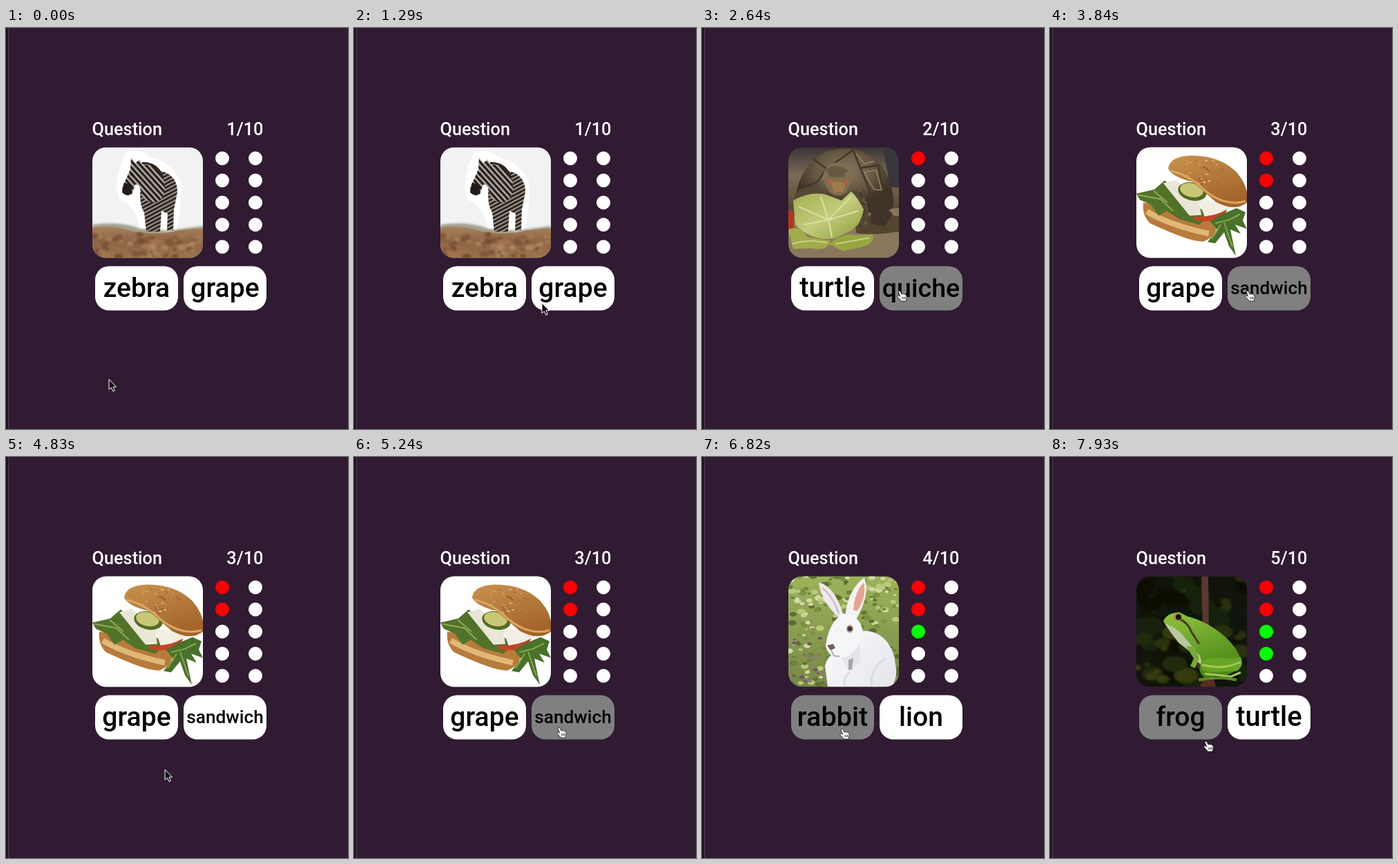
Recreate the animation shown at these times as an HTML page. Size 495 px wide and 580 px high, loop 7.99 s.

```html
<!DOCTYPE html>
<html lang="en">
<head>
<meta charset="utf-8">
<title>Picture quiz</title>
<style>
  html, body { margin: 0; width: 100%; height: 100%; overflow: hidden; background: #301b32; }
  svg { display: block; }
  text { font-family: Roboto, "Open Sans", sans-serif; font-weight: 500; }
  .head { font-size: 25.3px; fill: #fff; }
  .word { text-anchor: middle; fill: #000; }
  .photo, .cursor { display: none; }
  .on { display: inline; }
</style>
</head>
<body>
<svg width="495" height="580" viewBox="0 0 495 580">
  <defs>
    <clipPath id="card"><rect width="160" height="160" rx="20"/></clipPath>
    <pattern id="stripes" width="5" height="5" patternUnits="userSpaceOnUse" patternTransform="rotate(-28)">
      <rect width="5" height="5" fill="#a0968a"/><rect width="5" height="3" fill="#2d2723"/>
    </pattern>
    <pattern id="neck" width="6" height="6" patternUnits="userSpaceOnUse" patternTransform="rotate(48)">
      <rect width="6" height="6" fill="#b8aea2"/><rect width="6" height="3.4" fill="#241f1c"/>
    </pattern>
    <linearGradient id="soil" x2="0" y2="1">
      <stop stop-color="#a8835f"/><stop offset=".45" stop-color="#8e6442"/><stop offset="1" stop-color="#9c7450"/>
    </linearGradient>
    <linearGradient id="crust" x2=".5" y2="1">
      <stop stop-color="#c8924f"/><stop offset="1" stop-color="#a4652a"/>
    </linearGradient>
    <linearGradient id="lime" x2=".4" y2="1">
      <stop stop-color="#93c440"/><stop offset="1" stop-color="#4c8a16"/>
    </linearGradient>
    <linearGradient id="yard" x2="0" y2="1">
      <stop stop-color="#3a3438"/><stop offset=".25" stop-color="#7b6b54"/>
      <stop offset=".55" stop-color="#5b4a35"/><stop offset="1" stop-color="#8c795c"/>
    </linearGradient>
    <radialGradient id="shell" cy=".35">
      <stop stop-color="#85765d"/><stop offset=".6" stop-color="#665842"/><stop offset="1" stop-color="#3f3325"/>
    </radialGradient>
    <linearGradient id="leaf" x2="1" y2="1">
      <stop stop-color="#a0ae50"/><stop offset=".5" stop-color="#c3cb7a"/><stop offset="1" stop-color="#8d9c3c"/>
    </linearGradient>
    <linearGradient id="grass" x2="0" y2="1">
      <stop stop-color="#9cb35a"/><stop offset="1" stop-color="#768847"/>
    </linearGradient>
    <linearGradient id="fur" x2="1" y2=".6">
      <stop stop-color="#fbfbfc"/><stop offset="1" stop-color="#e6e8ee"/>
    </linearGradient>
    <filter id="soft"><feGaussianBlur stdDeviation="1.4"/></filter>
    <filter id="fine"><feGaussianBlur stdDeviation=".7"/></filter>
  </defs>

  <rect width="495" height="580" fill="#301b32"/>
  <rect width="3" height="580" fill="#1d1220"/>
  <rect x="3" width="1" height="580" fill="#514053"/>

  <text class="head" x="124.5" y="155">Question</text>
  <text class="head" id="count" x="372.5" y="155" text-anchor="end"></text>
  <g id="dots"></g>

  <g transform="translate(125 172.5)"><g clip-path="url(#card)">
    <g class="photo">
      <rect width="160" height="160" fill="#f2f2f3"/>
      <path d="M48 8Q70 0 84 14Q116 22 128 50Q130 90 122 118H68Q64 86 40 76Q28 54 48 8Z" fill="#fff"/>
      <path d="M0 112Q40 106 70 118L110 121Q140 116 160 114V135H0Z" fill="#a3a08e" filter="url(#soft)"/>
      <path d="M0 116Q30 112 60 122Q100 128 125 120L160 117V160H0Z" fill="url(#soil)"/>
      <g id="clods" filter="url(#soft)"></g>
      <g filter="url(#fine)">
        <path d="M71 46Q92 28 109 38Q123 46 123 65L118 90L117 120H108L109 96L100 92L98 122H78L75 94Q66 82 71 46Z" fill="url(#stripes)"/>
        <path d="M56 15L62 23L68 18L73 25Q94 24 100 40Q112 62 96 79Q78 82 72 70Q69 52 62 54L57 68Q49 72 44 65Q42 58 46 52L55 32Z" fill="url(#neck)"/>
        <path d="M72 23Q94 22 102 44" fill="none" stroke="#2c2521" stroke-width="3"/>
        <path d="M46 51L58 55L57 67Q49 72 43 65Z" fill="#211c1a"/>
        <circle cx="57" cy="39" r="2" fill="#111"/>
      </g>
    </g>

    <g class="photo" filter="url(#fine)">
      <rect width="160" height="160" fill="url(#yard)"/>
      <path d="M137 0H160V58H147Z" fill="#38363d"/>
      <path d="M0 100L160 88V160H0Z" fill="#8a775b"/>
      <path d="M98 105Q130 92 160 100V122Q125 128 98 124Z" fill="#54442f"/>
      <path d="M10 72Q18 24 55 6Q106-8 136 28Q156 62 151 88Q126 104 92 85L14 84Z" fill="url(#shell)"/>
      <path d="M94 4L104 30L130 26M104 30L119 66L150 76M119 66L99 84M36 17L55 31L94 4M55 31L42 50L14 62M130 26L139 73" fill="none" stroke="#42362a" stroke-width="2.5"/>
      <path d="M98 9L110 24L124 20M110 36L124 61L135 62L127 33Z" fill="none" stroke="#978768" stroke-width="1.5"/>
      <path d="M10 66Q28 50 53 66V85H8Z" fill="#564934"/>
      <path d="M92 62Q112 60 116 92Q118 118 105 121L89 112Z" fill="#544733"/>
      <path d="M119 92Q143 84 151 97L139 115L120 111Z" fill="#40342a"/>
      <path d="M49 46Q52 23 70 22Q89 23 92 46L84 65Q72 75 59 64Z" fill="#806d50"/>
      <path d="M54 32Q70 22 86 33L80 43H60Z" fill="#665942"/>
      <path d="M62 51Q71 46 82 53L80 64L66 66Z" fill="#a07b48"/>
      <g fill="#cf592a"><circle cx="60" cy="49" r="2.5"/><circle cx="84" cy="50" r="2.5"/></g>
      <g id="scales"></g>
      <path d="M0 91L8 94V118H0Z" fill="#b5361d"/>
      <path d="M7 77Q30 64 53 68L77 77L91 64Q100 72 109 90Q105 111 92 120L67 132Q34 137 10 112Z" fill="url(#leaf)"/>
      <path d="M15 86L58 105L91 71M58 105L101 92M58 105L22 112M58 105L63 130M58 105L47 72" fill="none" stroke="#d9dea4" stroke-width="2.2"/>
      <path d="M0 120Q14 110 28 130L61 135Q57 151 34 146L7 147Z" fill="#a0ad4a"/>
      <path d="M58 140Q78 123 99 127L122 126Q126 139 107 144L80 150Z" fill="#98a642"/>
      <path d="M5 140Q28 132 56 138M68 140L117 131" fill="none" stroke="#c9d083" stroke-width="2"/>
    </g>

    <g class="photo" filter="url(#fine)">
      <rect x="-5" y="-5" width="170" height="170" fill="#fff"/>
      <path d="M10 80Q35 83 66 101L118 107Q117 128 98 136Q82 139 20 110Q8 99 10 80Z" fill="#b77b3b"/>
      <path d="M15 93Q49 113 105 125" fill="none" stroke="#e0b878" stroke-width="8"/>
      <path d="M0 67L26 61L41 48L70 72L106 98L91 112L62 104L44 92L32 99L21 83L5 76Z" fill="#517329"/>
      <path d="M3 69L35 75L53 92M25 63L45 80" stroke="#90aa55" stroke-width="2" fill="none"/>
      <path d="M39 52L57 47L91 76L94 98L77 99Z" fill="#e9e6d7"/>
      <path d="M90 76L126 78L137 88L99 101Z" fill="#f1eee3"/>
      <path d="M82 100Q110 102 131 90L128 100Q109 111 83 105Z" fill="#c54325"/>
      <ellipse cx="81" cy="64" rx="21" ry="13" transform="rotate(12 81 64)" fill="#536c22"/>
      <ellipse cx="80" cy="62" rx="17" ry="10" transform="rotate(12 80 62)" fill="#c9c776"/>
      <path d="M46 31Q48 13 79 12Q121 12 145 36Q164 58 160 80Q143 94 115 79L81 50Q52 43 46 31Z" fill="url(#crust)"/>
      <path d="M49 34Q76 40 96 60Q127 87 158 78" fill="none" stroke="#d8a860" stroke-width="3"/>
      <g id="seeds"></g>
      <path d="M107 107L121 98L145 88L158 94L154 106L160 118L143 112L151 125L136 119L144 157L134 143L127 123L114 139L103 137L117 119Z" fill="#48712b"/>
      <path d="M114 110L134 105L150 97M127 109L139 144M122 112L109 133" fill="none" stroke="#89a64c" stroke-width="2"/>
    </g>

    <g class="photo">
      <rect width="160" height="160" fill="url(#grass)"/>
      <g id="meadow" filter="url(#fine)"></g>
      <g filter="url(#fine)">
        <path d="M76 62Q48 39 44 9Q67 14 80 57Z" fill="#eceaee"/>
        <path d="M49 17Q64 28 73 54" fill="none" stroke="#d3bcbb" stroke-width="2.5"/>
        <path d="M82 58Q86 19 110 2Q119 25 99 61Z" fill="#f4f1f3"/>
        <path d="M94 49Q96 22 109 9Q114 28 100 50Z" fill="#e6a492"/>
        <path d="M57 160L53 130Q57 113 70 111L101 80Q126 75 143 95Q154 110 155 128Q159 144 150 160Z" fill="url(#fur)"/>
        <path d="M54 101Q58 67 79 54Q104 55 108 81Q102 108 82 117Q60 122 54 101Z" fill="#f6f6f9"/>
        <path d="M76 118Q92 117 103 97L105 123L88 138Z" fill="#e3e5eb"/>
        <path d="M87 121L94 118L92 135H87Z" fill="#a6a49e"/>
        <ellipse cx="89" cy="76" rx="5" ry="6" fill="#bda4a0"/><circle cx="89" cy="76" r="3.5" fill="#44333a"/>
        <path d="M56 100L65 98L68 104L61 107Z" fill="#765f5e"/>
        <path d="M62 107L66 115L74 116" fill="none" stroke="#b7aaad" stroke-width="2"/>
        <path d="M82 160Q79 145 89 138M121 160Q117 133 141 119" fill="none" stroke="#d3d6de" stroke-width="2"/>
      </g>
    </g>

    <g class="photo">
      <rect width="160" height="160" fill="#10140a"/>
      <g id="thicket" filter="url(#soft)"></g>
      <g filter="url(#fine)">
        <path d="M94 0H104L105 75H96Z" fill="#5a3831"/>
        <path d="M83 122L97 145L92 160H115L110 139Z" fill="#592d24"/>
        <path d="M39 65Q44 53 62 52L74 58Q105 66 130 89Q147 105 151 121Q151 136 130 143L99 146Q89 141 93 127L85 112L70 99Q49 83 39 65Z" fill="url(#lime)"/>
        <path d="M41 68Q61 75 72 91L92 115L96 130Q83 121 79 110L61 96Q49 81 41 68Z" fill="#b9c7a0"/>
        <path d="M61 61Q75 67 80 81L91 98" fill="none" stroke="#473b29" stroke-width="3"/>
        <path d="M72 101L84 102L91 118L85 133L78 130L83 119Z" fill="#78aa36"/>
        <path d="M93 125Q107 115 132 119L151 117Q157 128 146 137L105 139Q92 135 93 125Z" fill="#68a524"/>
        <path d="M95 128Q125 136 151 124M99 141L137 145L151 139" fill="none" stroke="#a3c957" stroke-width="3"/>
        <path d="M90 150Q121 144 145 150" fill="none" stroke="#5d8a25" stroke-width="4"/>
        <circle cx="60" cy="59" r="6" fill="#a78a45"/><circle cx="61" cy="59" r="4" fill="#16130e"/>
      </g>
    </g>
  </g></g>

  <g id="buttons"></g>

  <g id="pointer" stroke-linejoin="round">
    <path class="cursor" d="M0 0V15L3.4 12L5.8 17.5L8.3 16.4L6 11H10.5Z" fill="#111" stroke="#fff"/>
    <path class="cursor" d="M2.2 2.5Q2.4 .6 4 1.2Q5.2 1.7 5.8 3.4L7 6.2Q8.3 4.6 9.5 6Q11 5 12 6.6Q13.6 6.3 14 8.2Q14.8 11 13.6 13.4L13.4 16H6.6Q4.6 14 3.2 12.2L.8 9.8Q.2 8 2 7.8Q3.4 8 4.6 9.4Z M7.6 10L8.2 13.4M9.8 9.8L10.2 13.2M11.9 9.6L12 13" fill="#fff" stroke="#1c1c1c" stroke-width=".9"/>
  </g>
</svg>
<script>
const LOOP = 7990;
const $ = id => document.getElementById(id);

// Each question: start time and the two answers as [word, font size].
const questions = [
  { at: 0, words: [["zebra", 39], ["grape", 39]] },
  { at: 2640, words: [["turtle", 40], ["quiche", 37.5]] },
  { at: 3840, words: [["grape", 39], ["sandwich", 26.2]] },
  { at: 5530, words: [["rabbit", 39.5], ["lion", 39]] },
  { at: 7120, words: [["frog", 39], ["turtle", 40]] }
];
const results = ["#f00", "#f00", "#0f0", "#0f0"];

// Hovered button from a given time on; -1 is none.
const hovers = [
  [0, -1], [1350, 1], [1460, -1], [1850, 0], [2110, 1], [4530, -1],
  [5110, 1], [5950, -1], [6630, 0]
];

// Pointer path: time, x, y.
const path = [
  [0, 149, 508], [490, 149, 508], [900, 212, 462], [1290, 272, 398],
  [1400, 262, 362], [1640, 222, 260], [1830, 205, 340], [1950, 216, 371],
  [2050, 246, 376], [2110, 265, 375], [2290, 282, 379], [4380, 282, 379],
  [4550, 261, 417], [4830, 230, 452], [4950, 236, 449], [5180, 296, 391],
  [5240, 293, 390], [5840, 293, 390], [5890, 270, 414], [6000, 246, 433],
  [6150, 226, 444], [6400, 210, 435], [6650, 200, 404], [6820, 199, 392],
  [7600, 199, 392], [7930, 222, 410], [LOOP, 222, 410]
];

function add(parent, tag, attrs) {
  const el = document.createElementNS("http://www.w3.org/2000/svg", tag);
  for (const key in attrs) el.setAttribute(key, attrs[key]);
  return parent.appendChild(el);
}

function scatter(id, seed, count, [x, y, w, h], size, colors) {
  const random = () => (seed = seed * 16807 % 2147483647) / 2147483647;
  for (let i = 0; i < count; i++) {
    const r = size * (0.4 + random());
    add($(id), "ellipse", {
      cx: x + w * random(), cy: y + h * random(), rx: r, ry: r * 0.65,
      fill: colors[i % colors.length]
    });
  }
}

scatter("clods", 71, 70, [0, 126, 160, 34], 5, ["#805638", "#ab8461", "#75502f", "#a17450"]);
scatter("scales", 47, 45, [90, 62, 26, 54], 1.8, ["#72634a", "#3f3325"]);
scatter("seeds", 23, 40, [72, 18, 55, 35], 1.5, ["#e0bb7a", "#98602b"]);
scatter("meadow", 37, 240, [0, 0, 160, 160], 4.5, ["#6c8338", "#b9c97c", "#7b9142", "#d3d9a4", "#5c7033"]);
scatter("meadow", 91, 26, [0, 75, 55, 80], 3, ["#735465", "#957583"]);
scatter("thicket", 53, 55, [0, 0, 160, 160], 15, ["#182008", "#0a0e06", "#29300e", "#11170a"]);
scatter("thicket", 19, 14, [0, 80, 80, 70], 13, ["#353b11", "#222a0b"]);

const dots = Array.from({ length: 10 }, (_, i) => add($("dots"), "circle", {
  cx: i < 5 ? 313 : 361, cy: 188.5 + i % 5 * 32, r: 10
}));
const buttons = [129, 257].map(x => ({
  box: add($("buttons"), "rect", { x, y: 344.5, width: 120, height: 64, rx: 20 }),
  label: add($("buttons"), "text", { class: "word", x: x + 60 })
}));
const photos = document.querySelectorAll(".photo");
const cursors = document.querySelectorAll(".cursor");

function position(t) {
  const i = path.findIndex(p => p[0] > t);
  const [t0, x0, y0] = path[i - 1], [t1, x1, y1] = path[i];
  const k = (t - t0) / (t1 - t0);
  return [x0 + (x1 - x0) * k, y0 + (y1 - y0) * k];
}

function showQuestion(index) {
  $("count").textContent = `${index + 1}/10`;
  photos.forEach((photo, i) => photo.classList.toggle("on", i === index));
  dots.forEach((dot, i) => dot.setAttribute("fill", i < index ? results[i] : "#fff"));
  buttons.forEach(({ label }, i) => {
    const [word, size] = questions[index].words[i];
    label.textContent = word;
    label.setAttribute("font-size", size);
    label.setAttribute("y", size < 30 ? 385 : 389);
  });
}

let shown = -1;
function render(now) {
  const t = now % LOOP;
  const index = questions.filter(q => q.at <= t).length - 1;
  if (index !== shown) showQuestion(shown = index);

  const hover = hovers.filter(h => h[0] <= t).pop()[1];
  buttons.forEach(({ box }, i) => box.setAttribute("fill", i === hover ? "#808080" : "#fff"));
  cursors.forEach((cursor, i) => cursor.classList.toggle("on", i === (hover < 0 ? 0 : 1)));
  $("pointer").setAttribute("transform", `translate(${position(t)})`);
}

const start = performance.now();
function tick() {
  render(performance.now() - start);
  requestAnimationFrame(tick);
}
tick();
</script>
</body>
</html>
```
